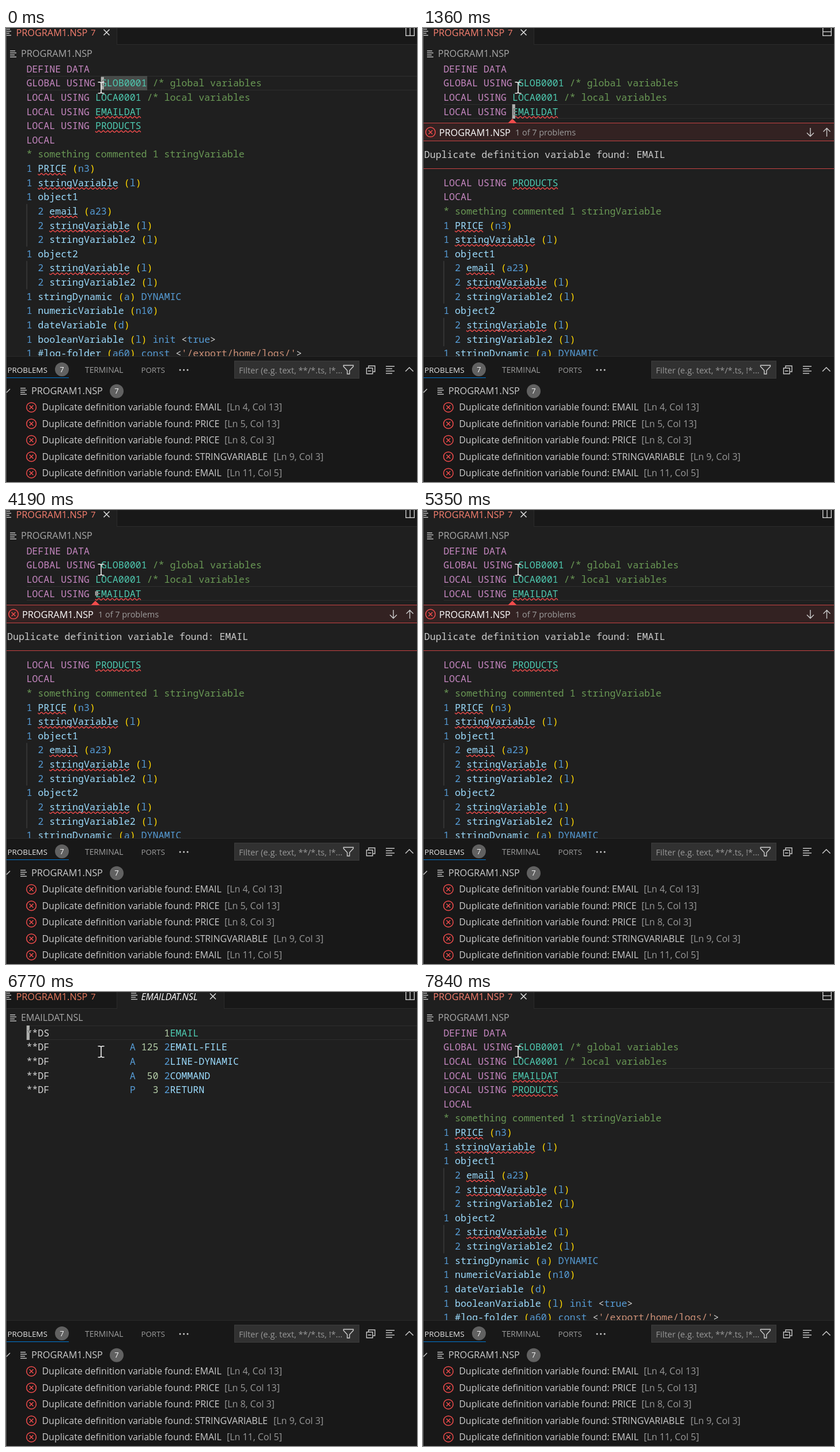
An HTML page with a canvas that plays this animation: 713 by 786 pixels, repeating every 8000 ms.

```html
<!DOCTYPE html>
<html lang="en">
<head>
<meta charset="utf-8">
<title>Editor</title>
<style>
  html, body { margin: 0; width: 100%; height: 100%; overflow: hidden; background: #1f1f1f; }
  canvas { display: block; width: 713px; height: 786px; }
</style>
</head>
<body>
<canvas id="stage"></canvas>
<script>
const W = 713, H = 786, LOOP = 8000;
const canvas = document.getElementById('stage');
const ctx = canvas.getContext('2d');
const dpr = window.devicePixelRatio || 1;
canvas.width = W * dpr;
canvas.height = H * dpr;

const UI = '"Open Sans", "Noto Sans", sans-serif';
const MONO = '"Noto Sans Mono", "DejaVu Sans Mono", monospace';
const CODE = 16.6, CHAR = 9.96, LEFT = 35.4, ROW = 24.63, FIRST = 70.7;
const BG = '#1f1f1f', DARK = '#181818', EDGE = '#2b2b2b', RED = '#f14c4c', FG = '#cccccc';
const INK = {
  p: '#c586c0', t: '#4ec9b0', c: '#6a9955', k: '#569cd6', v: '#9cdcfe',
  y: '#ffd700', s: '#ce9178', w: '#d4d4d4', n: '#b5cea8'
};

// Segments are "ink:text", and "~" after the ink adds a squiggle.
const field = (level, name, type, tail = '') =>
  `k:${level > 1 ? '  ' : ''}${level} |v${name[0] === '~' ? '~' : ''}:${name.replace('~', '')}|y: (|k:${type}|y:)${tail}`;
const program = [
  'p:DEFINE DATA',
  'p:GLOBAL USING |t:GLOB0001|c: /* global variables',
  'p:LOCAL USING |t:LOCA0001|c: /* local variables',
  'p:LOCAL USING |t~:EMAILDAT',
  'p:LOCAL USING |t~:PRODUCTS',
  'p:LOCAL',
  'c:* something commented 1 stringVariable',
  field(1, '~PRICE', 'n3'),
  field(1, '~stringVariable', 'l'),
  'k:1 |v:object1',
  field(2, '~email', 'a23'),
  field(2, '~stringVariable', 'l'),
  field(2, 'stringVariable2', 'l'),
  'k:1 |v:object2',
  field(2, '~stringVariable', 'l'),
  field(2, 'stringVariable2', 'l'),
  field(1, 'stringDynamic', 'a', '|k: DYNAMIC'),
  field(1, 'numericVariable', 'n10'),
  field(1, 'dateVariable', 'd'),
  field(1, 'booleanVariable', 'l', '|k: init |w:<|k:true|w:>'),
  field(1, '#log-folder', 'a60', "|k: const |w:<|s:'/export/home/logs/'|w:>")
];
const dataField = (type, size, name) =>
  `w:**DF|k:${' '.repeat(14)}${type}|n:${size.padStart(4)} |k:2|v:${name}`;
const dataArea = [
  `w:**DS|n:${' '.repeat(20)}1|t:EMAIL`,
  dataField('A', '125', 'EMAIL-FILE'),
  dataField('A', '', 'LINE-DYNAMIC'),
  dataField('A', '50', 'COMMAND'),
  dataField('P', '3', 'RETURN')
];

const problems = [
  ['EMAIL', '4, Col 13', 383], ['PRICE', '5, Col 13', 379], ['PRICE', '8, Col 3', 379],
  ['STRINGVARIABLE', '9, Col 3', 464], ['EMAIL', '11, Col 5', 383]
];

// Each scene starts with a full caret; flips alternate between shrinking and growing.
const scenes = [
  { at: 0, row: 1, col: 13, char: 'G', flips: [-740, -230, 280, 760] },
  { at: 1360, row: 3, col: 12, char: 'E', peek: true, flips: [1920, 2460, 2940, 3480, 4000, 4480, 5020] },
  { at: 5420, row: 0, col: 0, char: '*', data: true, flips: [5970, 6440] },
  { at: 6970, row: 3, col: 12, char: 'E', flips: [7520] }
];

const rowY = i => FIRST + i * ROW;
const rowTop = i => Math.round(rowY(i) - ROW / 2);

function rect(x, y, w, h, fill) {
  ctx.fillStyle = fill;
  ctx.fillRect(x, y, w, h);
}

function text(str, x, y, size, fill, font = UI, style = '') {
  ctx.font = `${style} ${size}px ${font}`;
  ctx.fillStyle = fill;
  ctx.fillText(str, x, y + size * 0.36);
}

function code(str, x, y, fill) {
  text(str, x, y, CODE, fill, MONO, '500');
}

// Draws one or more open polylines given as flat x,y lists.
function lines(stroke, width, ...paths) {
  ctx.strokeStyle = stroke;
  ctx.lineWidth = width;
  ctx.beginPath();
  for (const p of paths) {
    ctx.moveTo(p[0], p[1]);
    for (let i = 2; i < p.length; i += 2) ctx.lineTo(p[i], p[i + 1]);
  }
  ctx.stroke();
}

function disc(x, y, r, fill) {
  ctx.fillStyle = fill;
  ctx.beginPath();
  ctx.arc(x, y, r, 0, 7);
  ctx.fill();
}

function cross(x, y, r, color, width) {
  lines(color, width, [x - r, y - r, x + r, y + r], [x + r, y - r, x - r, y + r]);
}

function errorIcon(x, y) {
  ctx.strokeStyle = RED;
  ctx.lineWidth = 1.5;
  ctx.beginPath();
  ctx.arc(x, y, 8.3, 0, 7);
  ctx.stroke();
  cross(x, y, 3.4, RED, 1.4);
}

function fileIcon(x, y) {
  [9, 11, 8, 11].forEach((w, i) => rect(x, y - 5.6 + i * 3.5, w, 1.4, '#c5c5c5'));
}

function badge(x, y) {
  disc(x, y, 12, '#616161');
  text('7', x - 3.8, y, 13, '#f8f8f8');
}

function squiggle(x, y, w) {
  ctx.strokeStyle = RED;
  ctx.lineWidth = 1.4;
  ctx.beginPath();
  for (let i = 0; i <= w; i++) ctx.lineTo(x + i, y + 1.4 * Math.cos((i - 2.3) * 2 * Math.PI / 7.76));
  ctx.stroke();
}

function codeLine(line, y) {
  let x = LEFT;
  for (const part of line.split('|')) {
    const cut = part.indexOf(':'), str = part.slice(cut + 1);
    code(str, x, y, INK[part[0]]);
    if (part[1] === '~') squiggle(x, y + 10, str.length * CHAR);
    x += str.length * CHAR;
  }
}

function caretScale(scene, t) {
  const past = scene.flips.filter(f => f <= t);
  if (!past.length) return 1;
  const k = Math.min(1, (t - past[past.length - 1]) / 300);
  const eased = k * k * (3 - 2 * k);
  return past.length % 2 ? 1 - eased : eased;
}

function caret(scene, t) {
  const h = 25 * caretScale(scene, t);
  if (h < 0.3) return;
  const x = LEFT + scene.col * CHAR, y = rowTop(scene.row) + 12.5;
  ctx.save();
  ctx.beginPath();
  ctx.rect(Math.floor(x) + 0.7, y - h / 2, 5.2, h);
  ctx.clip();
  rect(x - 2, y - 13, 9, 26, '#aeafad');
  code(scene.char, x, rowY(scene.row), '#777a78');
  ctx.restore();
}

function pointer() {
  lines('#f0f0f0', 1.6,
    [159.5, 93.8, 163, 93.8, 165, 95, 167, 93.8, 170.5, 93.8],
    [165, 95, 165, 112],
    [159.5, 113, 163, 113, 165, 111.8, 167, 113, 170.5, 113]);
}

function tabs(scene, stacked) {
  const x0 = scene.data ? 193 : 0, x1 = scene.data ? 378 : 192;
  rect(0, 0, W, 28, DARK);
  rect(0, 28, W, 1, EDGE);
  rect(x0, 0, x1 - x0, 29, BG);
  rect(192, 0, 1, 28, EDGE);
  rect(x1, 0, 1, 28, EDGE);
  const red = scene.data ? '#e97b5f' : '#f88070';
  fileIcon(-2, 7);
  text('PROGRAM1.NSP', 17.5, 8, 16.25, red);
  text('7', 147, 8, 15, red);
  if (scene.data) {
    fileIcon(217, 7);
    text('EMAILDAT.NSL', 234.5, 8, 15.9, '#ffffff', UI, 'italic');
    cross(359, 7.5, 5, '#e0e0e0', 1.5);
  } else {
    cross(174.5, 7.5, 5, '#e0e0e0', 1.5);
  }
  ctx.strokeStyle = FG;
  ctx.lineWidth = 1.4;
  ctx.strokeRect(693.7, -1, 14.6, 14.3);
  lines(FG, 1.4, stacked ? [693, 6.5, 709, 6.5] : [701, 0, 701, 13]);
}

function peek() {
  rect(1, 157.2, W, 86.5, BG);
  rect(1, 164, W, 32, '#332222');
  for (const y of [164, 195, 243]) rect(1, y, W, 1, '#c64343');
  ctx.fillStyle = RED;
  ctx.beginPath();
  ctx.moveTo(147.5, 164.5);
  ctx.lineTo(155, 157);
  ctx.lineTo(162.5, 164.5);
  ctx.fill();
  errorIcon(13, 180.3);
  text('PROGRAM1.NSP', 28, 181, 16.25, '#ffffff');
  text('1 of 7 problems', 160, 181.3, 14.4, '#9d9d9d');
  lines(FG, 1.4, [672, 173, 672, 187], [666, 181.5, 672, 187.5, 678, 181.5],
    [700.5, 188, 700.5, 174], [694.5, 179.5, 700.5, 173.5, 706.5, 179.5]);
  code('Duplicate definition variable found: EMAIL', 2, 219.3, FG);
}

function editor(scene, t) {
  ctx.save();
  ctx.beginPath();
  ctx.rect(0, 29, W, 539);
  ctx.clip();
  fileIcon(7, 44.5);
  text(scene.data ? 'EMAILDAT.NSL' : 'PROGRAM1.NSP', 26, 44.3, scene.data ? 15.95 : 16.25, '#a9a9a9');

  const top = rowTop(scene.row);
  for (const y of [top, top + 24]) rect(36, y, W, 1, '#2e2e2e');
  if (scene.at === 0) rect(165, top, 80, 25, '#474b49');

  const shown = i => rowY(scene.peek && i > 3 ? i + 4 : i);
  if (!scene.data) {
    for (const [a, n] of [[10, 3], [14, 2]]) rect(35.5, shown(a) - ROW / 2, 1.2, n * ROW, '#404040');
  }
  (scene.data ? dataArea : program).forEach((line, i) => codeLine(line, shown(i)));
  if (scene.peek) peek();
  caret(scene, t);
  pointer();
  ctx.restore();
}

function panel() {
  rect(0, 568, W, H - 568, DARK);
  rect(0, 568, W, 1, EDGE);
  text('PROBLEMS', 2.5, 592.5, 13.4, '#e4e4e4');
  rect(0, 605, 109, 1, '#0078d4');
  badge(97, 591);
  text('TERMINAL', 137, 592.5, 13.8, '#9d9d9d');
  text('PORTS', 234.5, 592.5, 13.3, '#9d9d9d');
  for (const x of [302, 308.5, 315]) disc(x, 592, 1.5, FG);

  rect(396, 576, 217, 31, '#3c3c3c');
  rect(397, 577, 215, 29, '#313131');
  text('Filter (e.g. text, **/*.ts, !*...', 404, 592.3, 14.6, '#989898');
  lines(FG, 1.4, [585.5, 584, 602.5, 584, 602.5, 586, 596, 593, 596, 599, 592, 599, 592, 593, 585.5, 586, 585.5, 583.5]);

  ctx.strokeStyle = FG;
  ctx.lineWidth = 1.4;
  ctx.strokeRect(625.5, 588.7, 10.5, 10);
  lines(FG, 1.4, [628, 593.7, 633.5, 593.7], [629, 588, 629, 585, 640, 585, 640, 595, 636.5, 595]);
  [15, 11, 15, 11].forEach((w, i) => rect(659, 585 + i * 4.1, w, 1.4, FG));
  lines(FG, 1.5, [693, 594.5, 699.7, 587.8, 706.5, 594.5]);

  lines(FG, 1.4, [-5, 625, 1, 631, 7, 625]);
  fileIcon(25, 628.5);
  text('PROGRAM1.NSP', 44, 628.3, 16.25, FG);
  badge(192, 628.7);
  problems.forEach(([name, place, x], i) => {
    const y = 656.7 + i * 28.5;
    errorIcon(44, y);
    text('Duplicate definition variable found: ' + name, 62.5, y, 15.93, FG);
    text(`[Ln ${place}]`, x, y, 15.95, '#989898');
  });
}

function draw(t) {
  const scene = scenes.filter(s => s.at <= t).pop();
  const stacked = (t >= 950 && t < 1560) || t >= 7700;
  ctx.setTransform(dpr, 0, 0, dpr, 0, 0);
  rect(0, 0, W, H, BG);
  tabs(scene, stacked);
  editor(scene, t);
  panel();
  rect(0, 0, 1, H, '#5a5a5a');
}

const start = performance.now();
function tick() {
  draw((performance.now() - start) % LOOP);
  requestAnimationFrame(tick);
}
tick();
</script>
</body>
</html>
```
